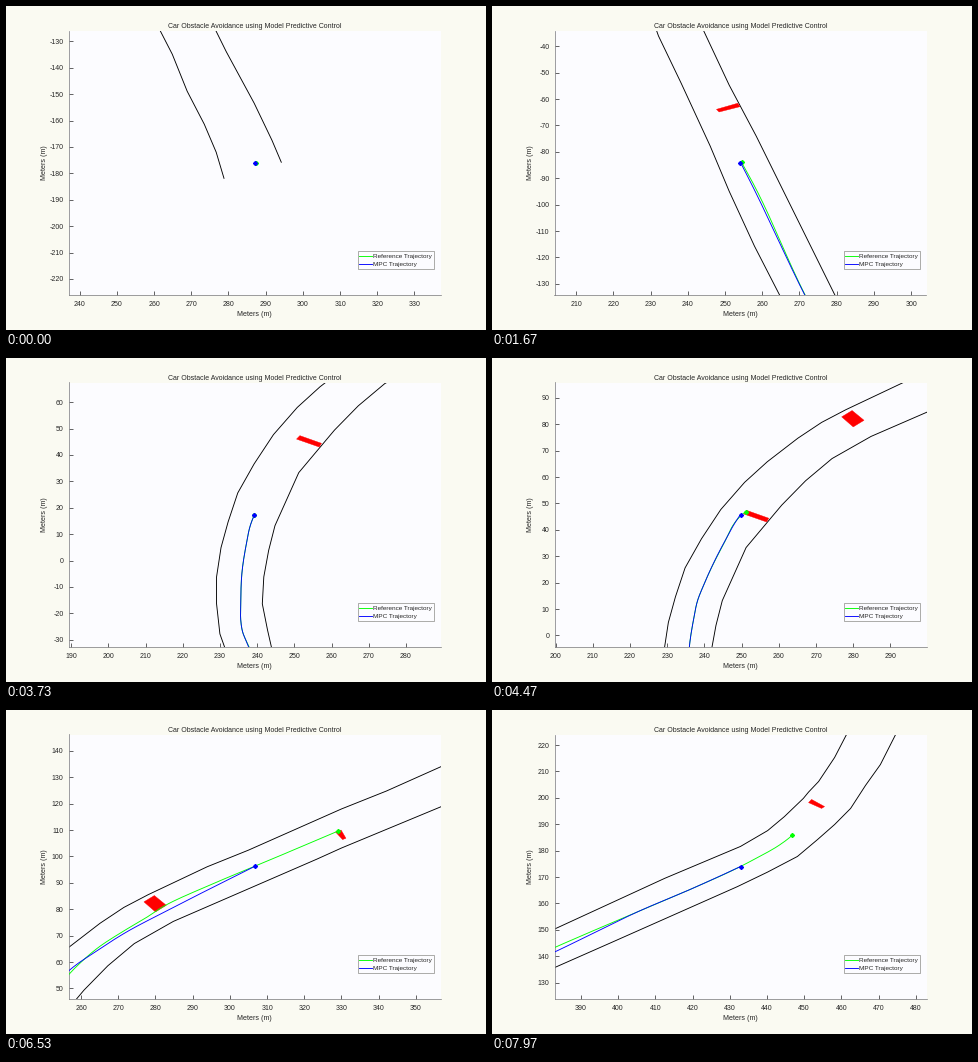
These frames come from a looping animation (480 px wide and 324 px high, 8 s). A matplotlib script:

```python
import numpy as np
import matplotlib.pyplot as plt
from matplotlib.animation import FuncAnimation
from matplotlib.lines import Line2D
from matplotlib.patches import Polygon, Rectangle
from matplotlib.ticker import FuncFormatter, MultipleLocator

W, H, DPI = 480, 324, 100
PX = 72 / DPI                  # points per pixel
INTERVAL, FRAMES = 32, 250
STEPS_PER_FRAME = 0.96         # simulation runs at 30 steps per second
LAST_STEP = 239
HALF_VIEW = 50

GREEN, BLUE, RED, INK = "#00ff00", "#0000ff", "#ff0000", "#262626"
LINE = 0.9 * PX

plt.rcParams["font.family"] = "Liberation Sans"

# Road edges in metres
LEFT = [
    (278.8, -181.9), (276.7, -172), (273.5, -161.4), (268.9, -148.9),
    (264.9, -134.9), (257.9, -115.7), (251.1, -94.9), (246, -77.8),
    (238.2, -54), (232.1, -36.1), (230, -27.8), (229.1, -16.4),
    (229.1, -6.2), (230.3, 4.9), (232.2, 14.6), (234.8, 25.6),
    (239.2, 36.6), (244.4, 47.7), (250.8, 58), (256.9, 65.8),
    (265.1, 74.7), (271.5, 80.7), (278, 85.5), (293.9, 96.1),
    (305, 102.4), (330, 118), (342.1, 124.8), (357.2, 134.3),
    (382.9, 150.3), (412.5, 169.5), (432.9, 181.6), (440.2, 187.6),
    (444.7, 192.9), (449.8, 199.8), (451.2, 202.2), (453.9, 206.2),
    (458.2, 215.3), (461.4, 224), (465, 236),
]
RIGHT = [
    (294.2, -175.8), (291.7, -167.5), (286.9, -153.4), (279.4, -133.9),
    (258.4, -74.1), (251.1, -54.7), (243.9, -33.1), (242.8, -26.3),
    (241.4, -16.4), (241.8, -6.2), (243.1, 3.8), (244.8, 13.2),
    (251.2, 33.3), (256.5, 42.2), (260.8, 49.4), (267.2, 58.6),
    (274.3, 67), (284.8, 75.4), (323.4, 99), (330, 103.2),
    (357.2, 119.1), (382.9, 135.7), (398.5, 145.4), (432.1, 166.4),
    (440.2, 171.9), (448.2, 177.8), (453.6, 184.2), (458.2, 189.9),
    (462.5, 196), (466.5, 204.7), (470.5, 212.6), (474.6, 224), (479, 238),
]

# Waypoints of the two trajectories
REF = [
    (287.4, -175.9), (271.4, -133.9), (256.8, -90), (254.4, -83.9),
    (248.8, -67.2), (240.2, -39.2), (237.6, -32), (236.1, -27),
    (235.6, -22.5), (235.6, -17.2), (236, -3.6), (237.1, 6.2),
    (238.2, 13.4), (239.8, 19.1), (245, 34.2), (249.4, 44.8),
    (251.7, 47.8), (253.5, 50.5), (258.9, 58.5), (261.5, 61.9),
    (264.8, 65.7), (270.9, 71.3), (277.7, 77), (282.3, 81.2),
    (294, 88.8), (306.9, 96.4), (329.2, 109.7), (357, 126.7),
    (382.9, 143.3), (405.5, 157), (420, 165.7), (432.9, 174),
    (436.7, 176.8), (442.8, 181.6), (446.8, 185.8),
]
CAR = [
    (287, -175.9), (271.3, -133.9), (256.5, -90.5), (254.1, -83.9),
    (248, -67.2), (244.2, -54.7), (239.9, -39.5), (237.5, -32),
    (236.1, -27), (235.6, -22.5), (235.6, -17.2), (236, -3.6),
    (237.1, 6.2), (238.2, 13.4), (239.8, 19.1), (244.9, 34.2),
    (250, 46.4), (253.5, 52.4), (258.9, 59.2), (262.9, 63),
    (273.1, 72.1), (281.9, 78.6), (294, 87.3), (306.9, 96.4),
    (318, 104.4), (329.5, 111.8), (357, 126.4), (382.9, 141.6),
    (393.1, 148.6), (405.5, 157), (420, 165.7), (432.9, 174),
]

OBSTACLES = [
    [(247.7, -63.9), (253.4, -61.6), (254, -62.9), (248.4, -64.9)],
    [(250.6, 46), (251.5, 47.3), (257.3, 44.4), (256.7, 43)],
    [(276.9, 82.8), (279.7, 85.2), (282.9, 81.5), (280, 79)],
    [(328.4, 109.3), (329.9, 110), (331.2, 106.9), (330.3, 106.4)],
    [(451.2, 198.2), (452, 199.4), (455.5, 196.7), (454.7, 196)],
]

# Northing reached at chosen steps
KEY_STEPS = [0, 50, 89, 134, 169, 196, 239]
CAR_NORTH = [-175.9, -83.9, -17.2, 46.4, 72.1, 96.4, 174]
REF_NORTH = [-175.9, -83.9, -17.4, 47.6, 81.2, 109.8, 185.8]
START_SPEED = 1.2


def smooth(x, xs, ys, first=None):
    """Cubic Hermite curve through the points (xs, ys)."""
    xs, ys = np.asarray(xs, float), np.asarray(ys, float)
    m = np.gradient(ys, xs, edge_order=2)
    if first is not None:
        m[0] = first
    i = np.clip(np.searchsorted(xs, x, side="right") - 1, 0, len(xs) - 2)
    h = xs[i + 1] - xs[i]
    u = (x - xs[i]) / h
    return ((1 + 2 * u) * (1 - u) ** 2 * ys[i] + u * (1 - u) ** 2 * h * m[i]
            + u * u * (3 - 2 * u) * ys[i + 1] + u * u * (u - 1) * h * m[i + 1])


def trail(points, north):
    """Path driven so far, up to the given northing."""
    east, ys = np.transpose(points)
    y = np.append(np.arange(ys[0], north, 0.5), north)
    return smooth(y, ys, east), y


def label(x, y, text, size, **kw):
    return fig.text(x / W, 1 - y / H, text, fontsize=size * PX, color=INK, **kw)


def stroke(x0, x1, y, color):
    fig.add_artist(Line2D([x0 / W, x1 / W], [1 - y / H] * 2, color=color,
                          lw=LINE, zorder=11))


fig = plt.figure(figsize=(W / DPI, H / DPI), dpi=DPI, facecolor="#fafaf2")
ax = fig.add_axes([62.5 / W, 35.5 / H, 372 / W, 264 / H], facecolor="#fcfcff")
ax.spines[["top", "right"]].set_visible(False)
for side in ("left", "bottom"):
    ax.spines[side].set(color="#77777c", linewidth=0.7 * PX)
number = FuncFormatter(lambda v, _: str(int(round(v))))
for axis, pad in ((ax.xaxis, 6.5), (ax.yaxis, 5)):
    axis.set_major_locator(MultipleLocator(10))
    axis.set_major_formatter(number)
    axis.set_tick_params(direction="in", length=3.7 * PX, width=0.7 * PX,
                         pad=pad * PX, color=INK, labelcolor=INK,
                         labelsize=7 * PX)

label(248.5, 21.7, "Car Obstacle Avoidance using Model Predictive Control", 7.03,
      ha="center", va="baseline")
label(248.5, 310.3, "Meters (m)", 7.2, ha="center", va="baseline")
label(39, 156.5, "Meters (m)", 7.2, ha="center", va="center", rotation=90)

for edge in (LEFT, RIGHT):
    ax.plot(*np.transpose(edge), color="black", lw=LINE)
for corners in OBSTACLES:
    ax.add_patch(Polygon(corners, facecolor=RED, edgecolor=RED, lw=0.4 * PX,
                         zorder=2))

STAR = dict(marker=(8, 2, 0), ms=4.4 * PX, mew=1.1 * PX, ls="none")
ref_line, = ax.plot([], [], color=GREEN, lw=LINE, zorder=3)
car_line, = ax.plot([], [], color=BLUE, lw=LINE, zorder=4)
ref_star, = ax.plot([], [], color=GREEN, zorder=5, **STAR)
car_star, = ax.plot([], [], color=BLUE, zorder=6, **STAR)

fig.add_artist(Rectangle((351.5 / W, 1 - 262.5 / H), 76 / W, 18 / H,
                         facecolor="#fcfcff", edgecolor="#8c8c88",
                         lw=0.7 * PX, zorder=10))
for y, color, name in ((249.5, GREEN, "Reference Trajectory"),
                       (257.5, BLUE, "MPC Trajectory")):
    stroke(353, 366, y, color)
    label(367, y + 2.4, name, 6.4, va="baseline", zorder=11)


def update(i):
    step = min(i * STEPS_PER_FRAME, LAST_STEP)
    for points, norths, line, star in (
            (REF, REF_NORTH, ref_line, ref_star),
            (CAR, CAR_NORTH, car_line, car_star)):
        x, y = trail(points, smooth(step, KEY_STEPS, norths, START_SPEED))
        line.set_data(x, y)
        star.set_data(x[-1:], y[-1:])
    # The view stays centred on the car
    ax.set_xlim(x[-1] - HALF_VIEW, x[-1] + HALF_VIEW)
    ax.set_ylim(y[-1] - HALF_VIEW, y[-1] + HALF_VIEW)
    return ref_line, car_line, ref_star, car_star


anim = FuncAnimation(fig, update, frames=FRAMES, interval=INTERVAL,
                     repeat=True, repeat_delay=0, blit=False)
plt.show()
```
